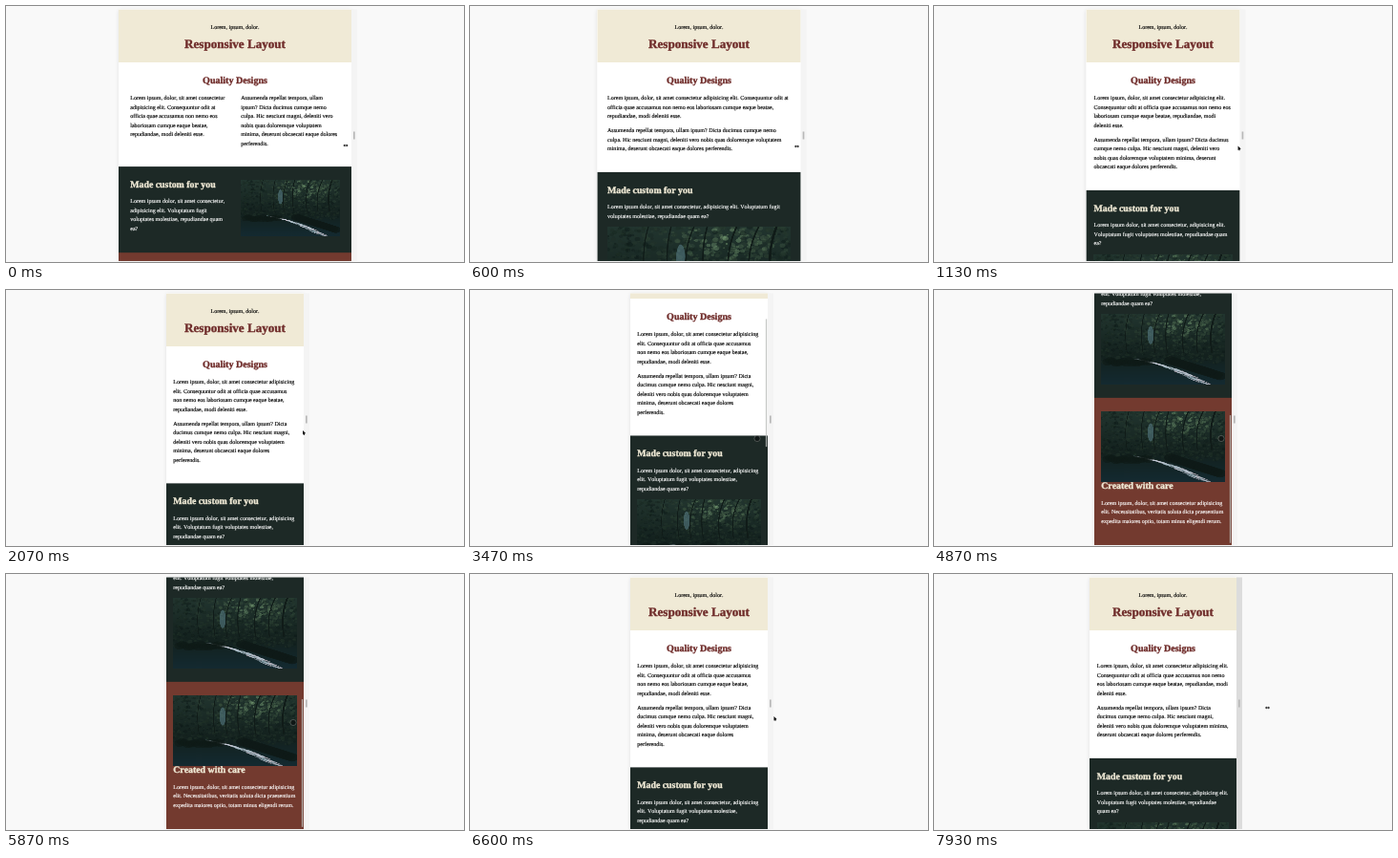
Write an HTML page with a canvas that moves like this. It is 480 px wide and 268 px high and loops after 8 s.

```html
<!DOCTYPE html>
<html lang="en">
<head>
<meta charset="utf-8">
<title>Responsive Layout</title>
<style>
  html, body { margin: 0; width: 100%; height: 100%; overflow: hidden; background: #f9f9f9; }
  canvas { display: block; width: 480px; height: 268px; }
</style>
</head>
<body>
<canvas id="stage"></canvas>
<script>
const W = 480, H = 268, LOOP = 8000, FPS = 15;
const TOP = 3.5, BOTTOM = 267, VIEW = BOTTOM - TOP;
const BODY = 6.04, LINE = 9.5, PAD = 14, GAP = 12.4, WIDE = 227, RATIO = 0.57;
const CREAM = '#f0ead6', RED = '#733a2f', DARK = '#1d2926', TITLE = '#6f2c2a';
const FAMILY = '"Liberation Serif", "Times New Roman", Times, serif';

const TEXT = {
  intro: 'Lorem, ipsum, dolor.',
  left: 'Lorem ipsum, dolor, sit amet consectetur adipisicing elit. Consequuntur odit at officia quae accusamus non nemo eos laboriosam cumque eaque beatae, repudiandae, modi deleniti esse.',
  right: 'Assumenda repellat tempora, ullam ipsum? Dicta ducimus cumque nemo culpa. Hic nesciunt magni, deleniti vero nobis quas doloremque voluptatem minima, deserunt obcaecati eaque dolores perferendis.',
  custom: 'Lorem ipsum dolor, sit amet consectetur, adipisicing elit. Voluptatum fugit voluptates molestiae, repudiandae quam ea?',
  care: 'Lorem ipsum, dolor, sit amet consectetur adipisicing elit. Necessitatibus, veritatis soluta dicta praesentium expedita maiores optio, totam minus eligendi rerum.'
};

const canvas = document.getElementById('stage');
const ctx = canvas.getContext('2d');
const dpr = window.devicePixelRatio || 1;
canvas.width = W * dpr;
canvas.height = H * dpr;

const smooth = u => u * u * (3 - 2 * u);
const easeOut = u => 1 - (1 - u) ** 2;

// Progress from 0 to 1 between two times
function move(t, from, to, ease = smooth) {
  return ease(Math.min(1, Math.max(0, (t - from) / (to - from))));
}

// Everything that moves, as a function of time
function state(t) {
  const shrink = move(t, 67, 1515), grow = move(t, 7350, 7933);
  const toPage = move(t, 2750, 3067), toEdge = move(t, 6420, 6600), toHandle = move(t, 6600, 7067);
  return {
    width: 244 - 100 * shrink + 10 * grow,
    scroll: 132 * move(t, 3270, 4200, easeOut) + 112 * move(t, 4200, 4867) - 244 * move(t, 5867, 6133),
    bar: move(t, 3270, 3333) - move(t, 6200, 6500),
    x: 356 - 44 * shrink - 11 * toPage + 18.5 * toEdge + 30 * grow,
    y: 146 + 3 * shrink + 6.5 * toPage - 4.5 * toEdge - 11 * toHandle,
    cursor: t > 2900 && t < 6500 ? touch : t < 900 || t > 6750 ? resizer : arrow,
    grabbed: t > 6750
  };
}

function rect(color, x, y, w, h) {
  ctx.fillStyle = color;
  ctx.fillRect(x, y, w, h);
}

function setFont(size, weight = '') {
  ctx.font = `${weight} ${size}px ${FAMILY}`;
}

// Text with a thin outline for a heavier look
function inked(text, x, y, color, weight) {
  ctx.fillStyle = ctx.strokeStyle = color;
  ctx.lineWidth = weight;
  ctx.fillText(text, x, y);
  ctx.strokeText(text, x, y);
}

function wrap(text, width) {
  setFont(100);
  const limit = width * 100 / BODY, lines = [];
  let line = '';
  for (const word of text.split(' ')) {
    const next = line ? line + ' ' + word : word;
    if (line && ctx.measureText(next).width > limit) {
      lines.push(line);
      line = word;
    } else line = next;
  }
  return lines.concat(line);
}

// Draws a paragraph and returns its last baseline
function para(text, x, y, width, color = '#000') {
  const lines = wrap(text, width);
  setFont(BODY);
  lines.forEach((line, i) => inked(line, x, y + i * LINE, color, 0.15));
  return y + (lines.length - 1) * LINE;
}

function heading(text, x, y, size, color) {
  setFont(size, 'bold');
  inked(text, x, y, color, 0.35);
}

// A soft woodland with a stream
function makePhoto() {
  const c = document.createElement('canvas');
  const w = c.width = 520, h = c.height = Math.round(520 * RATIO);
  const g = c.getContext('2d');
  let seed = 7;
  const rnd = () => (seed = seed * 16807 % 2147483647) / 2147483647;
  const blob = (x, y, rx, ry, color) => {
    g.fillStyle = color;
    g.beginPath();
    g.ellipse(x * w, y * h, rx * w, ry * h, 0, 0, 7);
    g.fill();
  };

  const base = g.createLinearGradient(0, 0, 0, h);
  base.addColorStop(0, '#22352f');
  base.addColorStop(0.6, '#13211e');
  base.addColorStop(1, '#142a31');
  g.fillStyle = base;
  g.fillRect(0, 0, w, h);

  // leaves, brightest under the open canopy
  for (let i = 0; i < 1100; i++) {
    const x = rnd(), y = rnd() * 0.7, r = 0.004 + rnd() * 0.014;
    const light = Math.exp(-(((x - 0.65) / 0.28) ** 2) - ((y - 0.12) / 0.25) ** 2);
    const v = rnd() * (0.25 + light);
    blob(x, y, r, r * 1.3, `rgba(${12 + 95 * v},${24 + 118 * v},${23 + 82 * v},.45)`);
  }
  blob(0.4, 0.3, 0.025, 0.13, 'rgba(92,130,138,.55)');

  // trunks
  g.strokeStyle = '#101b18';
  for (let i = 0; i < 7; i++) {
    const x = 0.2 + i * 0.11 + rnd() * 0.04;
    g.lineWidth = 3 + rnd() * 4;
    g.beginPath();
    g.moveTo(x * w, h * 0.55);
    g.quadraticCurveTo((x - 0.03) * w, h * 0.25, (x + 0.06 * rnd()) * w, 0);
    g.stroke();
  }

  // stream: thin streaks along a widening bend
  g.lineCap = 'round';
  for (let i = 0; i < 130; i++) {
    const u = rnd(), side = rnd() - 0.5;
    const x = 0.3 + 0.5 * u + side * 0.16, y = 0.66 + 0.3 * u ** 1.5 + side * 0.07;
    g.strokeStyle = `rgba(${165 + 60 * rnd()},200,212,${0.2 + 0.45 * rnd()})`;
    g.lineWidth = 2 + 2.5 * rnd();
    g.beginPath();
    g.moveTo(x * w, y * h);
    g.lineTo((x + 0.05) * w, (y + 0.008 + 0.03 * u) * h);
    g.stroke();
  }
  for (let i = 0; i < 16; i++) {
    const u = i / 15;
    blob(0.56 + 0.4 * u, 0.66 + 0.22 * u, 0.05, 0.06, 'rgba(14,25,23,.8)');
    blob(0.05 + 0.33 * u, 0.66 + 0.04 * rnd(), 0.04, 0.05, 'rgba(14,25,23,.6)');
  }
  return c;
}
const photo = makePhoto();

// Heading with paragraph; returns the bottom of the block
function block(title, text, x, y, width) {
  heading(title, x, y + 7.7, 9.85, CREAM);
  return para(text, x, y + 24.2, width, '#fff') + 9.4;
}

function picture(x, y, width) {
  ctx.drawImage(photo, x, y, width, width * RATIO);
  return y + width * RATIO;
}

// Draws the page and returns its full height
function page(left, width, scroll) {
  const wide = width >= WIDE, x = left + width * 0.05, inner = width * 0.9;
  const col = wide ? (inner - GAP) / 2 : inner, x2 = x + col + GAP;
  const start = TOP - scroll;

  rect('#fff', left, TOP, width, VIEW);
  rect(CREAM, left, start, width, 55.5);
  ctx.textAlign = 'center';
  setFont(BODY);
  inked(TEXT.intro, 240, start + 20.7, '#000', 0.15);
  heading('Responsive Layout', 240, start + 40.7, 13.1, TITLE);
  let y = start + 55.5;
  heading('Quality Designs', 240, y + 21.7, 10.05, TITLE);
  ctx.textAlign = 'left';

  let end = para(TEXT.left, x, y + 39, col);
  end = wide ? Math.max(end, para(TEXT.right, x2, y + 39, col))
             : para(TEXT.right, x, end + 15.3, col);

  y = end + 22.6;
  rect(DARK, left, y, width, H * 2);
  end = block('Made custom for you', TEXT.custom, x, y + PAD, col);
  end = wide ? Math.max(end, picture(x2, y + PAD, col)) : picture(x, end, col);

  y = end + PAD;
  rect(RED, left, y, width, H * 2);
  end = picture(x, y + PAD, col);
  end = wide ? Math.max(end, block('Created with care', TEXT.care, x2, y + PAD, col))
             : block('Created with care', TEXT.care, x, end, col);
  return end + PAD - start;
}

function triangle(x1, y1, x2, y2, x3, y3) {
  ctx.beginPath();
  ctx.moveTo(x1, y1);
  ctx.lineTo(x2, y2);
  ctx.lineTo(x3, y3);
  ctx.fill();
}

function arrow(x, y) {
  ctx.fillStyle = '#111';
  triangle(x - 1, y - 2, x - 1, y + 2.4, x + 2.1, y + 1.1);
  rect('#111', x, y + 1, 1, 1.8);
}

function resizer(x, y) {
  rect('#222', x - 1.5, y - 0.5, 3, 1);
  for (const side of [-1, 1]) {
    triangle(x + side * 2.6, y, x + side * 0.8, y - 1.5, x + side * 0.8, y + 1.5);
  }
}

function touch(x, y) {
  ctx.beginPath();
  ctx.arc(x, y, 3.1, 0, 7);
  ctx.fillStyle = 'rgba(10,12,12,.6)';
  ctx.fill();
  ctx.strokeStyle = 'rgba(150,155,150,.7)';
  ctx.lineWidth = 0.6;
  ctx.stroke();
}

function draw(t) {
  const s = state(t), left = 240 - s.width / 2, right = left + s.width;

  ctx.setTransform(dpr, 0, 0, dpr, 0, 0);
  ctx.textRendering = 'geometricPrecision';
  ctx.fontKerning = 'none';
  ctx.lineJoin = 'round';
  rect('#f9f9f9', 0, 0, W, H);

  ctx.save();
  ctx.shadowColor = 'rgba(0,0,0,.1)';
  ctx.shadowBlur = 4 * dpr;
  rect('#fff', left, TOP, s.width, VIEW);
  ctx.restore();
  rect(s.grabbed ? '#dcdcdc' : '#f4f4f4', right, TOP, 6, VIEW);
  rect('#b8b8b8', right + 2, 131.5, 1.7, 8);

  ctx.save();
  ctx.beginPath();
  ctx.rect(left, TOP, s.width, VIEW);
  ctx.clip();
  const k = VIEW / page(left, s.width, s.scroll);
  ctx.globalAlpha = s.bar;
  rect('rgba(190,192,190,.85)', right - 2.1, TOP + s.scroll * k + 1, 1.3, VIEW * k - 3);
  ctx.restore();

  s.cursor(s.x, s.y);
}

const begin = performance.now();
function tick() {
  const t = (performance.now() - begin) % LOOP;
  draw(Math.floor(t * FPS / 1000 + 0.06) * 1000 / FPS);
  requestAnimationFrame(tick);
}
tick();
</script>
</body>
</html>
```
